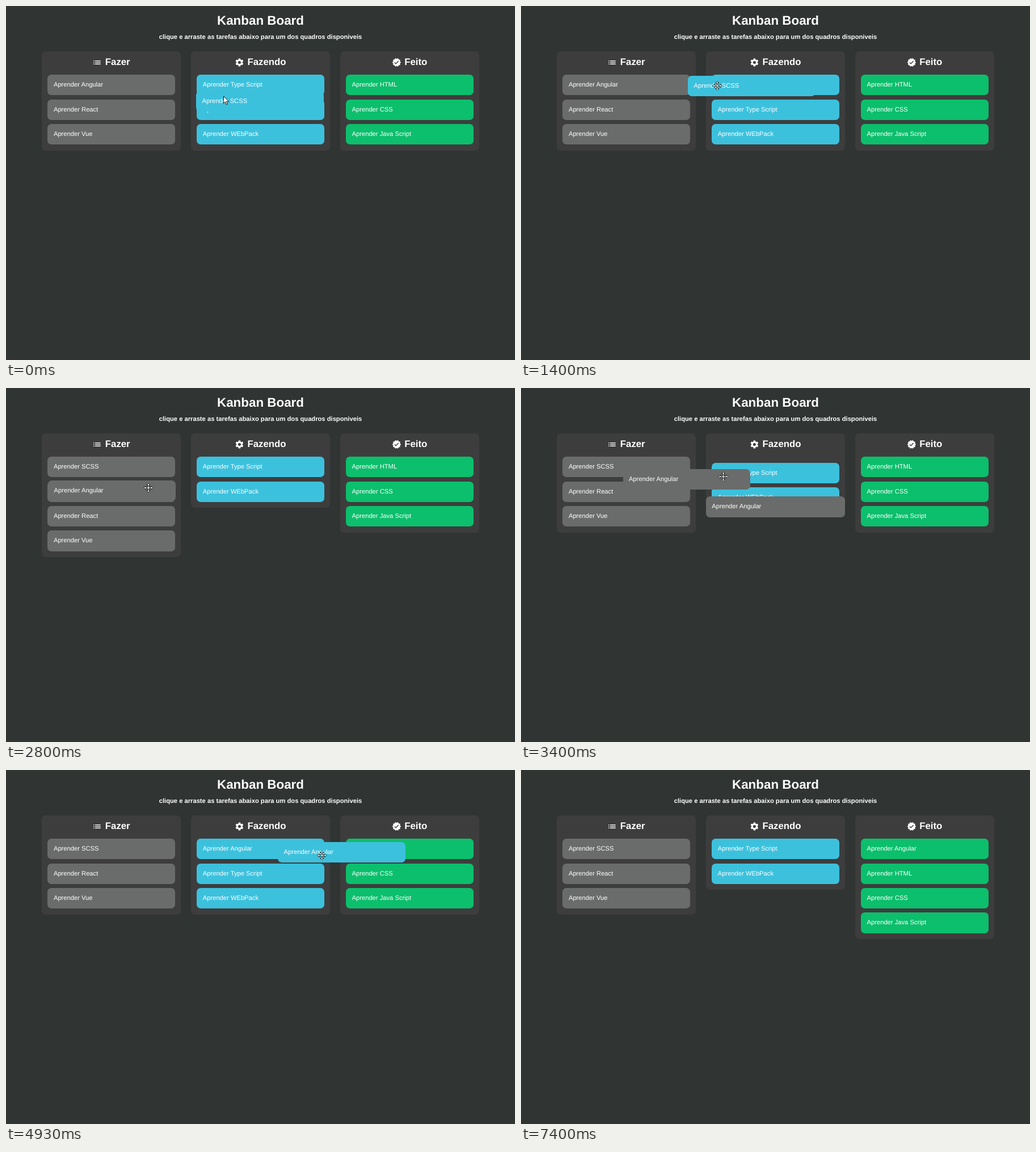
An HTML page that plays this animation: 897 by 624 pixels, repeating every 7740 ms.

```html
<!DOCTYPE html>
<html lang="pt">
<head>
<meta charset="utf-8">
<title>Kanban Board</title>
<style>
  html, body { margin: 0; width: 100%; height: 100%; overflow: hidden; background: #303432; }
  body { position: relative; color: #fff; font: 11.2px "Liberation Sans", Arial, sans-serif; text-rendering: geometricPrecision; }
  h1, h2, p { margin: 0; position: absolute; text-align: center; font-weight: bold; white-space: nowrap; }
  h1 { left: 0; width: 897px; top: 11px; font-size: 22.4px; line-height: 30px; }
  p { left: 0; width: 897px; top: 45px; line-height: 20px; }
  h2 { top: 7px; width: 100%; display: flex; justify-content: center; align-items: center; gap: 5.6px; font-size: 16.8px; line-height: 24px; }
  h2 svg { width: 16.8px; height: 16.8px; fill: #fff; }
  .column { position: absolute; top: 80px; width: 245.2px; border-radius: 7px; background: #3d3d3d; }
  .card { position: absolute; box-sizing: border-box; height: 36.4px; padding-left: 10.5px; border-radius: 7px; line-height: 36.4px; white-space: nowrap; }
  .ghost { z-index: 2; }
  #tip { position: absolute; z-index: 3; left: 652px; top: 164px; width: 31px; height: 18px; box-sizing: border-box; border: 1px solid #d0d0d0; background: #2b2b2b; color: #eee; font: 8.4px/16px "Open Sans", sans-serif; text-align: center; }
  #cursor { position: absolute; z-index: 4; left: 0; top: 0; width: 1px; height: 1px; overflow: visible; fill: #fff; stroke: #000; stroke-width: .9; }
</style>
</head>
<body>
<h1>Kanban Board</h1>
<p>clique e arraste as tarefas abaixo para um dos quadros disponiveis</p>
<div id="board"></div>
<div id="tip">Feito</div>
<svg id="cursor">
  <path id="arrow" d="M0 0V12.6L2.9 9.9 5 14.8 7 14 4.9 9.2H9Z"/>
  <path id="move" d="M0-8L3-5H1V-1H5V-3L8 0 5 3V1H1V5H3L0 8-3 5H-1V1H-5V3L-8 0-5-3V-1H-1V-5H-3Z"/>
</svg>
<script>
const LOOP = 7740, STEP = 1000 / 15;
const TOP = 121.1, CARD_W = 224.5, CARD_H = 36.4, PITCH = 43.4, PAD = 10.5;
const columnX = i => 62.95 + 262.8 * i;

const tooth = a => `<path d="M9.7 2h4.6l1 5h-6.6zM9.7 22h4.6l1-5h-6.6z" transform="rotate(${a} 12 12)"/>`;
const bullets = [7, 11, 15].map(y => `<path d="M3 ${y}h2v2h-2zM7 ${y}h14v2h-14z"/>`).join('');
const gear = [0, 60, 120].map(tooth).join('') + '<circle cx="12" cy="12" r="7.4"/><circle cx="12" cy="12" r="3.6" fill="#3d3d3d"/>';
const badge = '<path d="M23 12l-2.44-2.79.34-3.69-3.61-.82-1.89-3.2L12 2.96 8.6 1.5 6.71 4.69 3.1 5.5l.34 3.7L1 12l2.44 2.79-.34 3.7 3.61.82L8.6 22.5l3.4-1.47 3.4 1.46 1.89-3.19 3.61-.82-.34-3.69zm-12.91 4.72l-3.8-3.81 1.48-1.48 2.32 2.33 5.85-5.87 1.48 1.48z"/>';

const COLUMNS = [
  { name: 'Fazer', icon: bullets, color: '#6a6c6b', tasks: ['Angular', 'React', 'Vue'] },
  { name: 'Fazendo', icon: gear, color: '#3cc1dd', tasks: ['Type Script', 'SCSS', 'WEbPack'] },
  { name: 'Feito', icon: badge, color: '#0cbf6c', tasks: ['HTML', 'CSS', 'Java Script'] }
];

// A dragged task heads its new list on "enter" and takes that list's color on "drop";
// with "edge" it lies at the foot of the column until dropped.
const DRAGS = [
  { task: 'SCSS', from: 1, to: 1, grab: 0, enter: 870, drop: 870, grip: [48.5, 9] },
  { task: 'SCSS', from: 1, to: 0, grab: 1200, enter: 1600, drop: 2200, grip: [51.75, 18] },
  { task: 'Angular', from: 0, to: 1, grab: 2800, enter: 3330, drop: 4200, grip: [177, 13.5], edge: true },
  { task: 'Angular', from: 1, to: 2, grab: 4530, enter: 5130, drop: 5800, grip: [77.7, 24] }
];

// Pointer glides: start, end, x, y, power of the ease-out
const ORIGIN = [383.5, 159];
const GLIDES = [
  [0, 930, 388, 139, 1],
  [1130, 1930, 263, 144, 1],
  [2130, 2800, 251, 176, 1],
  [2800, 3870, 400, 148, 1.5],
  [4070, 4330, 414, 145, 1],
  [4470, 5870, 646, 154, 2.4],
  [6270, 6530, 50, 260, 1],
  [6530, 6930, 57, 516, 1],
  [6930, 7330, 177, 612, 1]
];

const $ = id => document.getElementById(id);
const show = (el, on) => { el.style.display = on ? '' : 'none'; };
const within = (t, a, b) => t >= a && t < b;
const progress = (t, a, b) => Math.min(1, Math.max(0, (t - a) / (b - a)));

function pointerAt(t) {
  let [x, y] = ORIGIN;
  for (const [start, end, toX, toY, power] of GLIDES) {
    const k = 1 - (1 - progress(t, start, end)) ** power;
    x += (toX - x) * k;
    y += (toY - y) * k;
  }
  return [x, y];
}

function add(className, html) {
  const el = document.createElement('div');
  el.className = className;
  el.innerHTML = html;
  $('board').append(el);
  return el;
}

function place(el, x, y, color, width = CARD_W) {
  el.style.left = x + 'px';
  el.style.top = y + 'px';
  el.style.width = width + 'px';
  el.style.background = color;
}

const panels = COLUMNS.map(({ name, icon }, i) => {
  const el = add('column', `<h2><svg viewBox="0 0 24 24">${icon}</svg>${name}</h2>`);
  el.style.left = columnX(i) + 'px';
  return el;
});
const cards = {};
for (const { tasks } of COLUMNS)
  for (const task of tasks) cards[task] = add('card', 'Aprender ' + task);
const ghost = add('card ghost', '');

function drawBoard(t, drag) {
  const lists = COLUMNS.map(c => [...c.tasks]);
  const entered = DRAGS.filter(d => t >= d.enter);
  const loose = drag && drag.edge && t >= drag.enter ? drag : null;
  for (const { task, from, to } of entered) {
    lists[from].splice(lists[from].indexOf(task), 1);
    lists[to].unshift(task);
  }
  if (loose) lists[loose.to].shift();

  lists.forEach((tasks, i) => {
    const isHost = loose && loose.to === i;
    const k = isHost ? progress(t, loose.enter, loose.enter + 200) : 1;
    const shift = k < 1 ? PAD : 0;
    tasks.forEach((task, j) => {
      const carried = drag && drag.task === task;
      place(cards[task], columnX(i) + PAD, TOP + shift + PITCH * j, COLUMNS[carried ? drag.from : i].color);
    });
    let bottom = TOP + PITCH * tasks.length + 3.5;
    if (isHost) {
      const y = bottom - 31 * (1 - k);
      place(cards[loose.task], columnX(i), y, COLUMNS[loose.from].color, 245.2);
      bottom = y + CARD_H;
    }
    panels[i].style.height = bottom - 80 + 'px';
  });
  for (const task in cards) cards[task].style.zIndex = loose && loose.task === task ? 1 : 0;
}

function draw(t) {
  const drag = DRAGS.find(d => within(t, d.grab, d.drop));
  const [x, y] = pointerAt(t);
  drawBoard(t, drag);

  show(ghost, drag);
  if (drag) {
    ghost.textContent = 'Aprender ' + drag.task;
    place(ghost, x - drag.grip[0], y - drag.grip[1], COLUMNS[drag.from].color);
  }

  const isArrow = t < 870 || t >= 6530;
  show($('arrow'), isArrow);
  show($('move'), !isArrow);
  show($('cursor'), !within(t, 6600, 6930) && t < 7400);
  $('cursor').style.transform = `translate(${x}px, ${y}px)`;
  show($('tip'), within(t, 6200, 6330));
}

const start = performance.now();
function tick() {
  const t = Math.max(0, performance.now() - start) % LOOP;
  // Hold each pose for one step, on times rounded to 10 ms
  draw(Math.round(Math.floor((t + 4) / STEP) * STEP / 10) * 10);
  requestAnimationFrame(tick);
}
tick();
</script>
</body>
</html>
```
